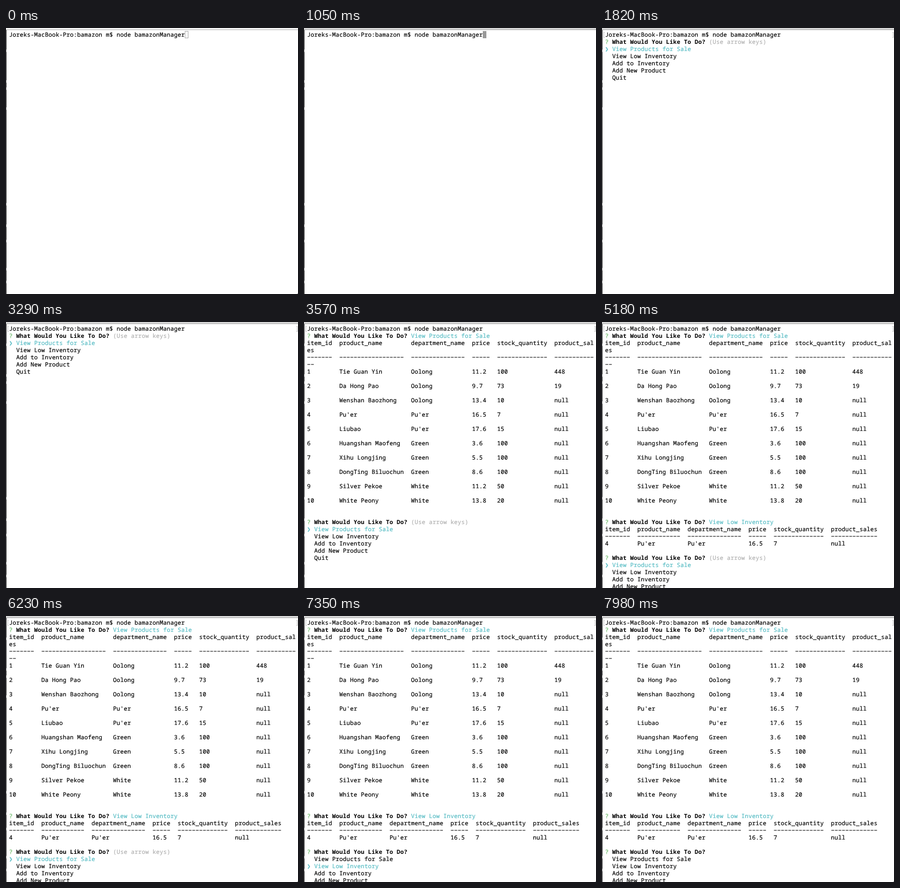
An HTML page that plays this animation: 570x520 px, repeating every 8000 ms.

```html
<!DOCTYPE html>
<html lang="en">
<head>
<meta charset="utf-8">
<title>Terminal session</title>
<style>
html, body { margin: 0; width: 570px; height: 520px; overflow: hidden; background: #fff; }
#win { position: relative; width: 570px; height: 520px; overflow: hidden; }
#win > * { position: absolute; }
#bar { left: 0; top: 0; width: 570px; height: 3px; background: #f5f5f5; border-bottom: 1px solid #b4b4b4; }
.focus #bar { background: #d8d8d8; border-color: #a6a6a6; }
#edge { left: 0; top: 4px; width: 1px; height: 516px; background: #252525; }
#edge i { position: absolute; left: 0; width: 1px; height: 5px; background: #909090; }
#corner { left: 569px; top: 519px; width: 1px; height: 1px; background: #444; }
#text {
  left: 6px; top: 7px; color: #000; white-space: pre;
  font: 500 11.3px/14px "Noto Sans Mono", "DejaVu Sans Mono", monospace;
  letter-spacing: .22px; text-rendering: geometricPrecision; font-variant-ligatures: none;
  -webkit-text-stroke: .2px;
}
#text div { position: relative; height: 14px; }
#text b { -webkit-text-stroke: 0; }
#text u { position: absolute; left: 0; text-decoration: none; font-weight: bold; }
.green { color: #62b45e; }
.cyan, #text u { color: #55bbc3; }
.hint { color: #b0b0b0; }
#cursor { box-sizing: border-box; width: 7px; height: 14px; border: 1px solid #a8a8a8; }
.focus #cursor { background: #999; border-color: #999; }
.mark { top: 8px; width: 1px; height: 9px; border: 1px solid #b8b8b8; }
#open { left: 3px; border-right: 0; }
#close { left: 567px; border-left: 0; }
</style>
</head>
<body>
<div id="win">
  <div id="bar"></div>
  <div id="edge"></div>
  <div id="corner"></div>
  <div class="mark" id="open"></div>
  <div class="mark" id="close"></div>
  <div id="cursor"></div>
  <div id="text"></div>
</div>
<script>
const LOOP = 8000, COLS = 80;
const $ = id => document.getElementById(id);
const span = (cls, s) => `<span class="${cls}">${s}</span>`;

const choices = ["View Products for Sale", "View Low Inventory", "Add to Inventory", "Add New Product", "Quit"];
const heads = ["item_id", "product_name", "department_name", "price", "stock_quantity", "product_sales"];
const products = `Tie Guan Yin,Oolong,11.2,100,448
Da Hong Pao,Oolong,9.7,73,19
Wenshan Baozhong,Oolong,13.4,10,null
Pu'er,Pu'er,16.5,7,null
Liubao,Pu'er,17.6,15,null
Huangshan Maofeng,Green,3.6,100,null
Xihu Longjing,Green,5.5,100,null
DongTing Biluochun,Green,8.6,100,null
Silver Pekoe,White,11.2,50,null
White Peony,White,13.8,20,null`.split("\n").map((row, i) => [String(i + 1), ...row.split(",")]);

// Padded columns, wrapped at the terminal width
function table(rows) {
  const widths = heads.map((h, c) => Math.max(h.length, ...rows.map(r => r[c].length)));
  const rule = widths.map(w => "\u2212".repeat(w));
  return [heads, rule, ...rows].flatMap(r => {
    const line = r.map((s, c) => s.padEnd(widths[c])).join("  ");
    return line.length > COLS ? [line.slice(0, COLS), line.slice(COLS)] : [line];
  });
}

const ask = tail => span("green", "?") + " <b>What Would You Like To Do?</b> " + tail;
const answer = i => ask(span("cyan", choices[i]));
const menu = (sel, fresh) => [
  ask(fresh ? span("hint", "(Use arrow keys)") : ""),
  ...choices.map((c, i) => i === sel ? "<u>\u276F</u>  " + span("cyan", c) : "  " + c)
];

const prompt = ["Joreks-MacBook-Pro:bamazon m$ node bamazonManager"];
const all = [...prompt, answer(0), ...table(products), ""];
const low = [...all, answer(1), ...table([products[3]]), ""];

// Start time, lines, cursor cell [column, row]
const steps = [
  [0, prompt, [49, 0]],
  [1260, prompt, [0, 1]],
  [1820, [...prompt, ...menu(0, true)]],
  [3570, [...all, ...menu(0, true)]],
  [4480, [...all, ...menu(1)]],
  [5110, [...low, ...menu(0, true)]],
  [7280, [...low, ...menu(1)]],
  [7560, [...low, ...menu(2)]],
  [7700, [...low, ...menu(3)]],
  [7840, [...low, ...menu(4)]]
];
const FOCUS = 630, ENTER = 1260;

$("edge").innerHTML = [38, 98, 112, 151, 338, 380, 410, 465, 490]
  .map(y => `<i style="top:${y}px"></i>`).join("");

let shown = null;
function draw() {
  const t = performance.now() % LOOP;
  const step = steps.findLast(s => s[0] <= t);
  $("win").className = t >= FOCUS ? "focus" : "";
  if (step !== shown) {
    shown = step;
    const [start, lines, cell] = step;
    $("text").innerHTML = lines.map(l => `<div>${l}</div>`).join("");
    $("open").hidden = $("close").hidden = start < ENTER;
    $("cursor").hidden = !cell;
    if (cell) {
      $("cursor").style.left = 6 + 7 * cell[0] + "px";
      $("cursor").style.top = 6 + 14 * cell[1] + "px";
    }
  }
  requestAnimationFrame(draw);
}
draw();
</script>
</body>
</html>
```
